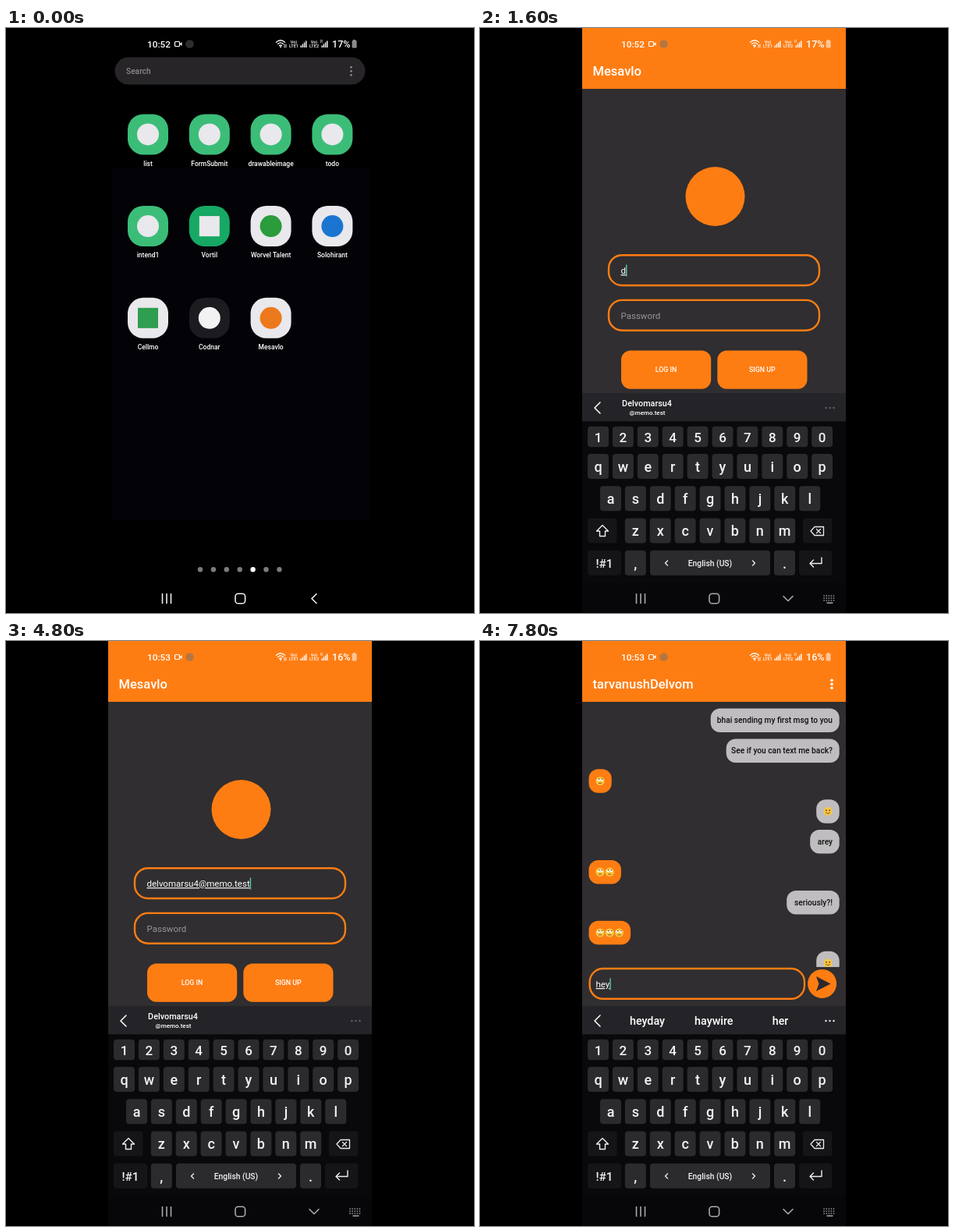
Animation of 600x750 px, one loop 8 s. Source, as an HTML page:

```html
<!DOCTYPE html>
<html lang="en">
<head>
<meta charset="utf-8">
<title>Chat app demo</title>
<style>
  html, body { margin: 0; width: 100%; height: 100%; overflow: hidden; background: #000; }
  svg { display: block; width: 100%; height: 100%; }
  text { font-family: Roboto, "Noto Sans", sans-serif; white-space: pre; }
</style>
</head>
<body>
<svg id="stage" viewBox="0 0 600 750"></svg>
<script>
const LOOP = 8000, STEP = 200;
const ORANGE = '#fe7d13', DARK = '#302e30', CURSOR = '#55bfa9';
const APP = 'Mesavlo', CONTACT = 'tarvanushDelvom';
const EMAIL = 'delvomarsu4@memo.test';
const stage = document.getElementById('stage');
const measure = document.createElement('canvas').getContext('2d');

// Shape helpers
const rect = (x, y, w, h, fill, r = 0, extra = '') =>
  `<rect x="${x}" y="${y}" width="${w}" height="${h}" rx="${r}" fill="${fill}" ${extra}/>`;
const circle = (x, y, r, fill) => `<circle cx="${x}" cy="${y}" r="${r}" fill="${fill}"/>`;
const line = (d, color = '#fff', width = 1.4) =>
  `<path d="${d}" fill="none" stroke="${color}" stroke-width="${width}" stroke-linecap="round" stroke-linejoin="round"/>`;
const shape = (d, fill) => `<path d="${d}" fill="${fill}"/>`;
const text = (x, middle, size, str, fill = '#fff', anchor = 'start', extra = '') =>
  `<text x="${x}" y="${middle + size * 0.36}" font-size="${size}" fill="${fill}" text-anchor="${anchor}" ${extra}>${str}</text>`;
const centered = (x, y, size, str, fill = '#fff', extra = '') => text(x, y, size, str, fill, 'middle', extra);
const menuDots = (x, y, color, r = 1.8) => [-5, 0, 5].map(d => circle(x, y + d, r, color)).join('');
const MEDIUM = 'font-weight="500"';

function statusBar(time, battery, badge) {
  const bars = x => [0, 1, 2, 3].map(k => rect(x + k * 2.2, 22.5 - k * 2, 1.4, 2.5 + k * 2, '#fff')).join('');
  const lte = (x, n) => centered(x, 17.6, 5.6, 'Vo)', '#fff', MEDIUM) + centered(x, 23.3, 5.6, 'LTE' + n, '#fff', MEDIUM);
  return text(181, 20.5, 11.8, time, '#fff', 'start', MEDIUM) +
    rect(216.5, 17.5, 6, 6, 'none', 1, 'stroke="#fff" stroke-width="1.2"') + shape('M222.5 20.5l3-2.5v5z', '#fff') +
    circle(235.5, 20.5, 5.3, badge) +
    line('M346.5 18.2Q352 13.4 357.5 18.2M348.5 20.4Q352 17.4 355.5 20.4M350.5 22.6Q352 21.4 353.5 22.6', '#fff', 1.3) +
    circle(352, 24.3, 1, '#fff') + line('M357 21v4M359 21v4', '#fff', 0.9) +
    lte(369, 1) + bars(377.5) + lte(395, 2) + text(403, 16.8, 5, 'R') + bars(404.5) +
    text(418, 20.5, 12.6, battery, '#fff', 'start', MEDIUM) +
    rect(443.6, 16, 6, 9.5, '#fff', 1, 'opacity=".55"') + rect(445, 15, 3, 1, '#fff', 0, 'opacity=".55"');
}

function navBar(keyboardOpen) {
  const c = keyboardOpen ? '#aaa' : '#eee';
  return rect(131, 711, 338, 39, keyboardOpen ? '#070609' : '#000') +
    line('M200.5 725.5v12M206 725.5v12M211.5 725.5v12', c, 1.6) +
    rect(294, 725.2, 12.6, 12.6, 'none', 3.6, `stroke="${c}" stroke-width="1.6"`) +
    (keyboardOpen
      ? line('M389 728.5l6 6 6-6', c, 1.6) +
        [728, 731, 734].map(y => line(`M441 ${y}h15`, c, 1.6).replace('/>', ' stroke-dasharray=".2 2.9"/>')).join('') +
        line('M445 737h7', c, 1.4)
      : line('M398 725.5l-6 6 6 6', c, 1.6));
}

function home() {
  const green = '#3bbd78', light = '#e9e8ec';
  const apps = [
    ['list', green], ['FormSubmit', green], ['drawableimage', green], ['todo', green],
    ['intend1', green], ['Vortil', '#16a864', light, true], ['Worvel Talent', light, '#2a9c3c'], ['Solohirant', light, '#1a75d1'],
    ['Cellmo', light, '#2f9e50', true], ['Codnar', '#1c1b1f', '#f2f2f2'], [APP, light, '#ec7a1c'],
  ];
  const icons = apps.map(([label, tile, mark = light, square], i) => {
    const x = 182 + i % 4 * 78.8, y = 136.4 + Math.floor(i / 4) * 117.7;
    return rect(x - 26, y - 26, 52, 52, tile, 20) +
      (square ? rect(x - 13, y - 13, 26, 26, mark) : circle(x, y, 14, mark)) +
      centered(x, y + 37.2, 8.5, label, '#fff', MEDIUM);
  }).join('');
  const pages = [0, 1, 2, 3, 4, 5, 6].map(k => circle(249 + k * 16.9, 694.3, 3.2, k === 4 ? '#fff' : '#7c7b7d')).join('');
  return rect(135, 180, 332, 450, '#020207') +
    rect(139.5, 37.5, 321, 35, '#272528', 17.5) + text(154, 55, 10.2, 'Search', '#8b898d', 'start', MEDIUM) +
    menuDots(442.5, 55.3, '#8b898d', 1.4) + icons + pages;
}

const header = title =>
  rect(131, 0, 338, 78, ORANGE) + text(144.5, 55.2, 16.5, title, '#fff', 'start', MEDIUM);
const body = rect(131, 78, 338, 633, DARK);
const outline = (x, y, w) => rect(x, y, w, 38.8, DARK, 17, `stroke="${ORANGE}" stroke-width="2.4"`);

function inputText(x, y, value, hint, focused, underlined) {
  measure.font = '11.5px Roboto, "Noto Sans", sans-serif';
  const end = x + measure.measureText(value).width;
  return (value
    ? text(x, y, 11.5, value, '#fff', 'start', underlined ? 'text-decoration="underline"' : '')
    : text(x, y, 11.5, hint, '#98969a')) +
    (focused ? rect(end, y - 7.5, 1.5, 15, CURSOR) : '');
}

function login(email, password, focus) {
  const button = (x, label) => rect(x, 413.5, 115.2, 49.2, ORANGE, 12) + centered(x + 57.5, 438.3, 8.8, label, '#fff', MEDIUM);
  return header(APP) + body + circle(301.5, 216, 38, ORANGE) +
    outline(165, 291.2, 270) + inputText(180.5, 311, email, 'Email', focus === 'email', focus === 'email') +
    outline(165, 348.9, 270) + inputText(180.5, 368.7, password, 'Password', focus === 'password') +
    button(181, 'LOG IN') + button(304.3, 'SIGN UP');
}

function contacts(dimmed) {
  if (!dimmed) return header('App Name') + body + menuDots(451, 55.2, '#fff');
  return body + rect(131, 0, 338, 79.5, '#c76718') + rect(131, 0, 338, 1.2, '#8f4813') +
    text(144.5, 56.7, 16.3, 'App Name', '#dbd2cb', 'start', MEDIUM) + menuDots(451, 56.5, '#ddd');
}

// A face rolls its eyes or simply smiles.
function face(x, y, rolling) {
  const eye = dx => rolling
    ? circle(x + dx, y - 1.5, 1.7, '#fff') + circle(x + dx + 0.4, y - 2.4, 0.8, '#5b3a16')
    : circle(x + dx, y - 1.2, 0.9, '#5b3a16');
  return circle(x, y, 5.6, '#f8c545') + eye(-2.1) + eye(2.1) +
    line(rolling ? `M${x - 1.8} ${y + 2.8}h3.6` : `M${x - 2.6} ${y + 1.8}q2.6 2.4 5.2 0`, '#7a4a18', 0.9);
}

// Numbers are faces: positive ones sent by the other side, zero is a smile in reply.
const MESSAGES = [['bhai sending my first msg to you', 165], ['See if you can text me back?', 145], 1, 0,
  ['arey', 37.5], 2, ['seriously?!', 67.5], 3, 0];

function bubble(message, i) {
  const y = 86.5 + i * 38.9, mid = y + 15.2;
  if (message > 0) {
    const faces = Array.from({ length: message }, (_, k) => face(154 + k * 12.2, mid, true)).join('');
    return rect(139.5, y, 17 + message * 12.2, 30.5, ORANGE, 12) + faces;
  }
  const [label, width] = message || ['', 29.5];
  return rect(460.7 - width, y, width, 30.5, '#bfbdbf', 12) +
    (label ? text(452, mid, 10.2, label, '#111', 'end', MEDIUM) : face(446, mid, false));
}

function chat(loaded, draft, raised) {
  const y = raised ? 439.4 : 681.5;
  return header(CONTACT) + menuDots(451, 55.2, '#fff') + body +
    (loaded ? MESSAGES.map(bubble).join('') : '') +
    rect(131, y - 21.4, 338, 51, DARK) + outline(140.7, y - 19.4, 275.3) +
    inputText(148.5, y + 0.5, draft, 'Type somthing....', true, true) +
    circle(438.6, y, 18.5, ORANGE) + shape(`M431 ${y - 9.5}l18.5 9.5-18.5 9.5 3.5-9.5z`, '#2b292b');
}

function keyboard(suggestions, menuColor) {
  const key = (x, y, w, h, label = '', size = 18, fill = '#2b2a2d') =>
    rect(x, y, w, h, fill, 4) + centered(x + w / 2, y + h / 2 + 0.5, size, label, '#f3f3f3', MEDIUM);
  const row = (letters, x, y, h, size) =>
    [...letters].map((c, k) => key(x + k * 31.9, y, 27, h, c, size)).join('');
  const special = (x, y, w, label) => key(x, y, w, 32, label, 15.3, '#151417');
  return rect(131, 468, 338, 282, '#09080b') + rect(131, 468, 338, 36.3, '#242327') +
    line('M154 480l-7 7 7 7', '#fff', 1.5) +
    [-5, 0, 5].map(d => circle(448.5 + d, 487, 1.2, menuColor)).join('') + suggestions +
    row('1234567890', 138, 510.8, 26.4, 17) + row('qwertyuiop', 138, 546, 32) +
    row('asdfghjkl', 154, 587.3, 32) + row('zxcvbnm', 185.8, 628.5, 32) +
    special(138, 628.5, 37.5) + special(414, 628.5, 37.5) +
    special(138, 669.8, 43, '!#1') + special(409, 669.8, 42.5) +
    key(185.8, 669.8, 27, 32, ',') + key(377, 669.8, 27, 32, '.') +
    key(218, 669.8, 154, 32, 'English (US)', 10.3) +
    line('M240.5 683l-3 3 3 3M349.5 683l3 3-3 3', '#eee', 1.3) +
    line('M157 637.5l-7.5 7.5h4v6.5h7v-6.5h4z', '#eee') +
    line('M424 645l5-5.5h11.5v11h-11.5zM431.5 642.5l5 5M436.5 642.5l-5 5', '#eee', 1.3) +
    line('M438 679v7.5h-14.5M427.5 682l-4.5 4.5 4.5 4.5', '#eee');
}

const words = list => list.map((w, k) => centered(214.5 + k * 85.3, 486.8, 14.3, w, '#fff', MEDIUM)).join('');
const emailHint = centered(214, 481.3, 10.8, 'Delvomarsu4', '#fff', MEDIUM) + centered(214.5, 492.8, 8, '@memo.test', '#fff', MEDIUM);

function typedLength(ms) {
  if (ms < 1600) return 0;
  return ms <= 2600 ? Math.round((ms - 1400) / 150) : Math.min(21, 8 + Math.floor((ms - 2600) / 2000 * 13));
}

function loginKeyboard(ms, typed) {
  if (ms >= 5000) return keyboard(ms >= 5400 ? words(['12.5']) : '', '#66646a');
  const guesses = typed >= 5 && typed < 9 ? words(['', 'delvom', 'डेलवम']) : '';
  return keyboard(emailHint + guesses, '#66646a');
}

function picture(ms) {
  const typed = typedLength(ms);
  const dots = '•'.repeat(Math.max(0, Math.min(6, (ms - 5000) / STEP)));
  const keysUp = ms >= 1400 && ms < 6600 || ms >= 7400;
  let screen;

  if (ms < 400) screen = home();
  else if (ms < 600) screen = `<g opacity=".3">${home()}</g><g transform="translate(75 94) scale(.75)">${login('', '')}</g>`;
  else if (ms < 6400) {
    const focus = ms < 1400 ? '' : ms < 5000 ? 'email' : 'password';
    screen = login(EMAIL.slice(0, typed), dots, focus);
    if (keysUp) screen += `<g transform="translate(0 ${ms < 1600 ? 120 : 0})">${loginKeyboard(ms, typed)}</g>`;
  } else if (ms < 7000) {
    screen = contacts(ms < 6600) + (keysUp ? loginKeyboard(ms, typed) : '');
  } else {
    const draft = ms < 7600 ? '' : ms < 7800 ? 'he' : 'hey';
    screen = chat(ms >= 7200, draft, keysUp);
    if (keysUp) screen += keyboard(draft ? words(['heyday', 'haywire', 'her']) : '', '#eee');
  }

  const badge = ms < 600 ? '#2d2c2e' : '#b57642';
  return screen + navBar(keysUp) + statusBar(ms < 3800 ? '10:52' : '10:53', ms < 2000 ? '17%' : '16%', badge);
}

let shown = -1;
function play(now) {
  const ms = Math.floor(now % LOOP / STEP) * STEP;
  if (ms !== shown) stage.innerHTML = picture(shown = ms);
  requestAnimationFrame(play);
}
play(0);
</script>
</body>
</html>
```
